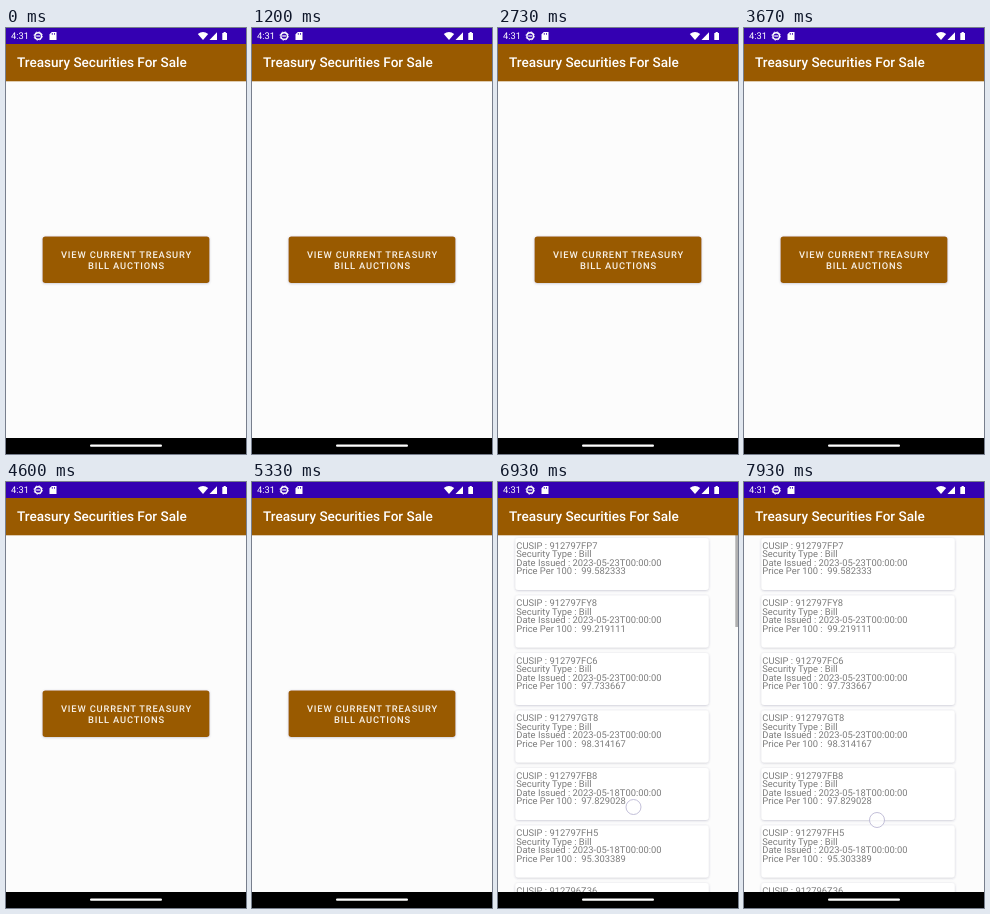
An HTML page that plays this animation: 240x426 px, repeating every 8000 ms.

```html
<!DOCTYPE html>
<html lang="en">
<head>
<meta charset="utf-8">
<title>Treasury Securities</title>
<style>
  html, body { margin: 0; width: 100%; height: 100%; overflow: hidden; background: #fcfcfc; }
  svg { display: block; width: 100vw; height: 100vh; }
  text { font-family: Roboto, sans-serif; white-space: pre; text-rendering: geometricPrecision; }
  .medium { font-weight: 500; fill: #fff; }
  .label { font-size: 9.33px; letter-spacing: .0893em; fill: #f8f2e8; }
  .row { font-size: 9.4px; fill: #7c7c7c; }
</style>
</head>
<body>
<svg viewBox="0 0 240 426">
  <defs>
    <filter id="shadow" x="-10%" y="-10%" width="120%" height="130%">
      <feDropShadow dx="0" dy="0.6" stdDeviation="0.8" flood-color="#40406c" flood-opacity=".3"/>
    </filter>
  </defs>
  <rect width="240" height="426" fill="#fcfcfc"/>

  <g id="home">
    <rect x="36.6" y="208.6" width="166.8" height="46.4" rx="2.7" fill="#995a00" filter="url(#shadow)"/>
    <text class="medium label" x="55" y="230">VIEW CURRENT TREASURY</text>
    <text class="medium label" x="82" y="241">BILL AUCTIONS</text>
  </g>

  <g id="list">
    <g id="cards"></g>
    <rect id="scrollbar" x="237.3" y="53" width="2.7" height="92" fill="#b0b0b0"/>
    <circle id="pointer" r="7.5" fill="#fff" fill-opacity=".65" stroke="#bcb8d4" stroke-width=".9"/>
  </g>

  <rect y="16" width="240" height="37.3" fill="#995a00"/>
  <text class="medium" x="11" y="39.3" font-size="13.55">Treasury Securities For Sale</text>

  <rect width="240" height="16" fill="#3400b2"/>
  <g fill="#fff">
    <text x="5" y="11.3" font-size="9.3">4:31</text>
    <g fill="none" stroke="#fff">
      <circle cx="32.2" cy="8" r="3.3" stroke-width="1.4"/>
      <circle cx="32.2" cy="8" r="4.2" stroke-width=".8" stroke-dasharray="1.65 1.65"/>
      <path d="M30.2 8H34.2" stroke-width="1.2"/>
    </g>
    <path d="M45.8 4H50.5V12H43.5V6.3Z"/>
    <path d="M46.3 5V6.8M48.5 5V6.8" stroke="#3400b2" stroke-width=".8"/>
    <path d="M191.8 6Q197 2 202.2 6L197 12Z"/>
    <path d="M203.5 12H211V4.2Z"/>
    <path d="M216.3 5H217.6V4H219.8V5H221V12H216.3Z"/>
  </g>

  <rect y="410" width="240" height="16" fill="#000"/>
  <rect x="84" y="416.6" width="72" height="2.2" rx="1.1" fill="#fff"/>
</svg>
<script>
  const LOOP = 8000, LIST_AT = 6470;
  const byId = id => document.getElementById(id);
  const progress = (t, from, to) => Math.min(1, Math.max(0, (t - from) / (to - from)));

  const bills = [
    ["912797FP7", 23, "99.582333"],
    ["912797FY8", 23, "99.219111"],
    ["912797FC6", 23, "97.733667"],
    ["912797GT8", 23, "98.314167"],
    ["912797FB8", 18, "97.829028"],
    ["912797FH5", 18, "95.303389"],
    ["912796Z36", 18, ""]
  ];

  byId("cards").innerHTML = bills.map(([cusip, day, price], i) => {
    const lines = [
      `CUSIP : ${cusip}`,
      "Security Type : Bill",
      `Date Issued : 2023-05-${day}T00:00:00`,
      `Price Per 100 :  ${price}`
    ];
    const text = lines.map((line, j) =>
      `<text class="row" x="18.3" y="${10.7 + j * 8.5}">${line}</text>`).join("");
    return `<g transform="translate(0 ${56 + i * 57.5})">
      <rect x="17.4" width="193.3" height="52" rx="3" fill="#fff" filter="url(#shadow)"/>${text}</g>`;
  }).join("");

  function draw(now) {
    const t = now % LOOP;
    const listOpen = t >= LIST_AT;
    byId("home").style.display = listOpen ? "none" : "";
    byId("list").style.display = listOpen ? "" : "none";
    byId("scrollbar").style.opacity = 1 - progress(t, 7500, 7750);

    const move = progress(t, 6930, 7930);
    byId("pointer").setAttribute("cx", 135.5 - 2.5 * move);
    byId("pointer").setAttribute("cy", 325 + 13 * move);
    requestAnimationFrame(draw);
  }
  draw(performance.now());
</script>
</body>
</html>
```
